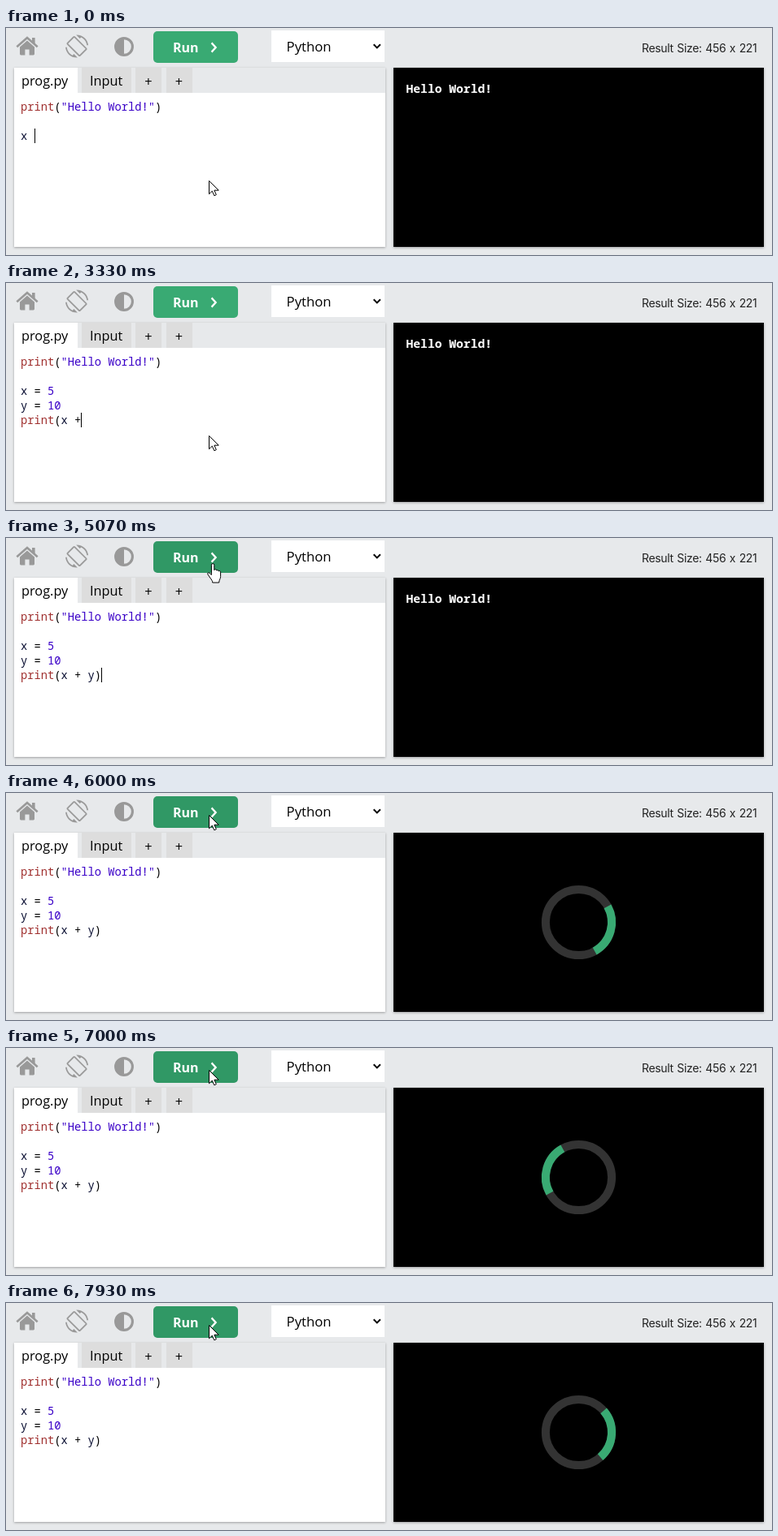
An HTML page for the animation above (8 s loop, 941x280 px).

```html
<!DOCTYPE html>
<html lang="en">
<head>
<meta charset="utf-8">
<title>Code editor run</title>
<style>
  html, body { margin: 0; width: 100%; height: 100%; overflow: hidden; background: #e7e9eb; }
  svg { display: block; width: 941px; height: 280px; }
  text { white-space: pre; }
  .ui { font-family: "Open Sans", "Noto Sans", sans-serif; font-size: 16.3px; }
  .code { font: 13.75px "Noto Sans Mono", monospace; fill: #000; }
  .builtin { fill: #a0302f; }
  .literal { fill: #3a00c8; }
  .name { fill: #0b1033; }
  .out { font: 600 14.67px "Noto Sans Mono", monospace; fill: #fff; }
  .size { font: 14px Inter, sans-serif; letter-spacing: -.35px; word-spacing: 1px; fill: #222; }
  .panel { filter: drop-shadow(0 1px 1.5px rgba(0, 0, 0, .32)); }
</style>
</head>
<body>
<svg viewBox="0 0 941 280">
  <rect width="941" height="280" fill="#e7e9eb"/>

  <g id="icons" fill="#999">
    <path d="M13.3 23.2L26 12L38.7 23.2" fill="none" stroke="#999" stroke-width="2.6"/>
    <path d="M32 12h3.6v7.5L32 16.5z"/>
    <path d="M17 23.5L26 15.6L35 23.5V32q0 1.4-1.4 1.4H28.6V26.5H23.4V33.4H18.4Q17 33.4 17 32z"/>
    <path transform="translate(73 8.5) scale(1.17)" d="M16.5 2.5c3.3 1.6 5.6 4.7 6 8.5H24C23.4 4.8 18.3 0 12 0l-.7.03 3.8 3.8zM10.2 1.75c-.6-.6-1.5-.6-2.1 0L1.75 8.1c-.6.6-.6 1.5 0 2.1l12 12c.6.6 1.5.6 2.1 0l6.4-6.3c.6-.6.6-1.5 0-2.1zm4.6 19.4L2.8 9.2l6.4-6.4 12 12zM7.5 21.5C4.25 19.9 1.9 16.8 1.55 13H.05C.56 19.2 5.7 24 12 24l.7-.03-3.8-3.8z"/>
    <circle cx="145" cy="23" r="10.4" fill="none" stroke="#999" stroke-width="3.1"/>
    <path d="M145 12.5a10.5 10.5 0 0 0 0 21z"/>
  </g>

  <rect id="run" x="181" y="4" width="104" height="39" rx="5"/>
  <text class="ui" x="205" y="30" fill="#fff" style="font-size:16px;font-weight:700">Run</text>
  <path d="M252.6 18.4L257.6 24L252.6 29.6" fill="none" stroke="#fff" stroke-width="2.4"/>

  <rect x="326" y="3" width="139" height="39" fill="#fff"/>
  <text class="ui" x="344.6" y="29" style="font-size:16.7px">Python</text>
  <path d="M451.7 20.3L455.8 24.4L459.9 20.3" fill="none" stroke="#000" stroke-width="2"/>
  <text class="size" x="781" y="30">Result Size: 456 x 221</text>

  <rect class="panel" x="10" y="49" width="456" height="221" fill="#e7e9eb"/>
  <path d="M10 49H88V80H466V270H10z" fill="#fff"/>
  <path d="M93 49h61v31h-61zM159 49h32v31h-32zM197 49h32v31h-32z" fill="#ddd"/>
  <g class="ui">
    <text x="19" y="71">prog.py</text>
    <text x="103" y="71">Input</text>
    <text x="175" y="71.5" text-anchor="middle">+</text>
    <text x="212.5" y="71.5" text-anchor="middle">+</text>
  </g>
  <g id="code" class="code"></g>
  <rect id="caret" width="1" height="18"/>

  <rect class="panel" x="476" y="49" width="455" height="221"/>
  <text id="out" class="out" x="491.5" y="80">Hello World!</text>
  <g id="spinner" fill="none" stroke-width="10">
    <circle cx="703.5" cy="159.5" r="40.6" stroke="#333"/>
    <path id="arc" stroke="#39aa73"/>
  </g>

  <g id="pointer" fill="#fff" stroke="#000" stroke-linejoin="round">
    <path id="arrow" d="M-.5 .5V16.8L3.3 13.2L5.8 18.8L8.3 17.7L5.9 12.2H11.2z"/>
    <path id="hand" transform="translate(-7 -1)" d="M5.4 14.4V2.3a1.7 1.7 0 0 1 3.4 0V8.6a1.6 1.6 0 0 1 3 .5a1.5 1.5 0 0 1 2.5 .8a1.4 1.4 0 0 1 2.3 1.2V16.5c0 3-1.9 4.2-1.9 7.5H6.7c0-2.2-1.1-3.4-2.4-5.2L.9 13.9c-.9-1.6 .9-2.8 2.1-1.7z"/>
  </g>
</svg>
<script>
const FPS = 15, LOOP = 8000;
const START = 'print("Hello World!")\n\nx ';
const TYPED = '= 5\ny = 10\nprint(x + y)';
// Tick at which each typed character lands
const KEYS = [5, 7, 10, 13, 16, 19, 22, 24, 27, 28, 31, 34, 35, 36, 37, 38, 41, 45, 47, 50, 52, 55, 57];
const CHAR_W = 8.25, LINE_H = 18, LEFT = 18, TOP = 88;
const BLINK = 8, CLICK = 80, LOADING = 82;

const $ = id => document.getElementById(id);
const show = (id, on) => $(id).setAttribute('visibility', on ? 'visible' : 'hidden');
const ease = (t, a, b) => {
  const p = Math.min(1, Math.max(0, (t - a) / (b - a)));
  return p * p * (3 - 2 * p);
};

function highlight(line) {
  const kind = s => s === 'print' ? 'builtin' : /["\d]/.test(s) ? 'literal' : 'name';
  return line.replace(/"[^"]*"|\bprint\b|\b[xy]\b|\d+/g,
    s => `<tspan class="${kind(s)}">${s}</tspan>`);
}

let shownText = null;
function drawCode(tick) {
  const count = KEYS.filter(k => k <= tick).length;
  const text = START + TYPED.slice(0, count);
  const lines = text.split('\n');
  if (text !== shownText) {
    shownText = text;
    $('code').innerHTML = lines.map((line, i) =>
      `<text x="${LEFT}" y="${TOP + LINE_H * i + 14}">${highlight(line)}</text>`).join('');
  }
  const row = lines.length - 1;
  const lastKey = count ? KEYS[count - 1] : -6;
  $('caret').setAttribute('x', Math.round(LEFT + CHAR_W * lines[row].length));
  $('caret').setAttribute('y', TOP + LINE_H * row);
  show('caret', tick < CLICK && Math.floor((tick - lastKey) / BLINK) % 2 === 0);
}

function drawPointer(tick) {
  const reach = ease(tick, 69, 76), settle = ease(tick, 76, 79);
  const x = 250 + 4 * reach - 4 * settle;
  const y = 188 - 156 * reach - 5 * settle;
  const hover = y < 43;
  const hand = hover && tick < LOADING;
  $('pointer').setAttribute('transform', `translate(${x} ${y})`);
  $('run').setAttribute('fill', hover ? '#309865' : '#39aa73');
  show('hand', hand);
  show('arrow', !hand);
}

function drawOutput(tick) {
  const loading = tick >= LOADING;
  show('out', !loading);
  show('spinner', loading);
  $('arc').setAttribute('transform', `rotate(${16 + 12 * (tick - 90)} 703.5 159.5)`);
}

function render(ms) {
  const tick = Math.floor((ms % LOOP + 4) * FPS / 1000) % (LOOP * FPS / 1000);
  drawCode(tick);
  drawPointer(tick);
  drawOutput(tick);
}

const d = 40.6 * Math.SQRT1_2;
$('arc').setAttribute('d', `M${703.5 + d} ${159.5 - d}A40.6 40.6 0 0 1 ${703.5 + d} ${159.5 + d}`);

const t0 = performance.now();
function loop() {
  render(performance.now() - t0);
  requestAnimationFrame(loop);
}
loop();
</script>
</body>
</html>
```
